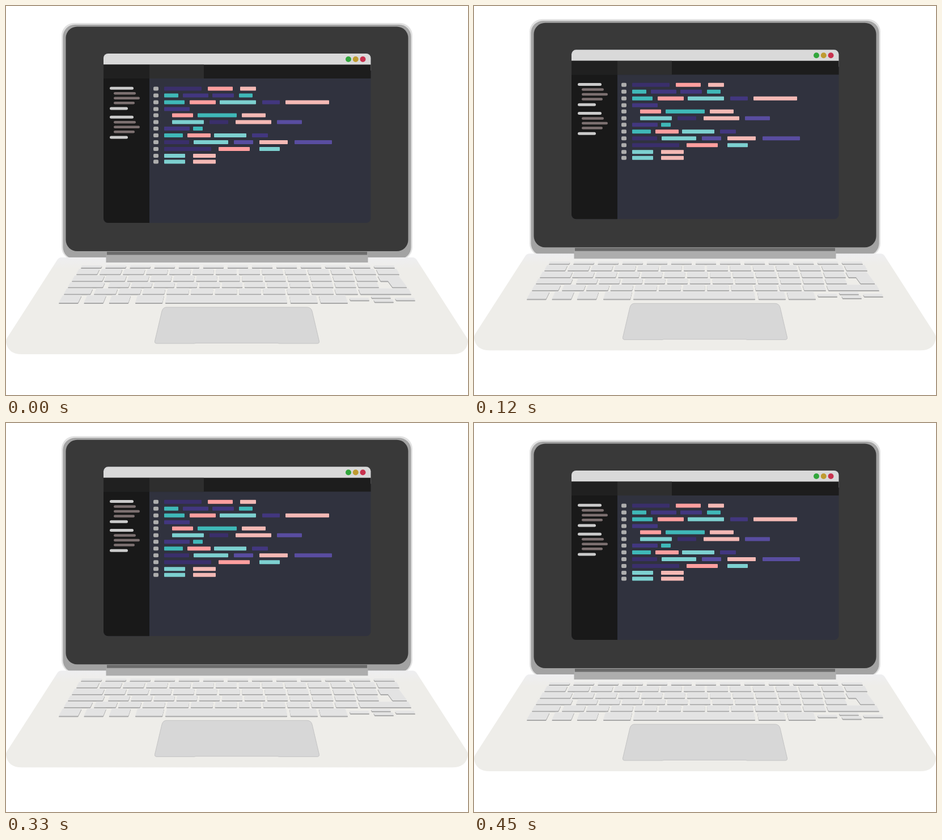
Recreate the animation shown at these times as an HTML page with a canvas. Size 815x687 px, loop 480 ms.

```html
<!DOCTYPE html>
<html lang="en">
<head>
<meta charset="utf-8">
<title>Laptop</title>
<style>
  html, body { margin: 0; width: 100%; height: 100%; overflow: hidden; background: #fff; }
  canvas { display: block; }
</style>
</head>
<body>
<canvas width="815" height="687"></canvas>
<script>
const ctx = document.querySelector('canvas').getContext('2d');
const CENTER = 407.5, HORIZON = -50;

function box(x, y, w, h, r, color) {
  ctx.fillStyle = color;
  ctx.beginPath();
  ctx.roundRect(x, y, w, h, r);
  ctx.fill();
}

function shape(d, color, stroke) {
  const path = new Path2D(d);
  ctx.fillStyle = color;
  ctx.fill(path);
  if (stroke) {
    ctx.strokeStyle = stroke;
    ctx.lineWidth = 1;
    ctx.stroke(path);
  }
}

// Moves x from one depth line to another along the perspective.
const project = (x, from, to) => CENTER + (x - CENTER) * (to - HORIZON) / (from - HORIZON);

function keycap(d) {
  ctx.save();
  ctx.translate(0, 1);
  shape(d, '#a6a6a6', '#a6a6a6');
  ctx.translate(0, -2);
  shape(d, '#e3e3e3', '#e7e7e7');
  ctx.restore();
}

// Fills left..right (measured along the front edge) with equal keys.
function keys(top, bottom, left, right, count = 1, gap = 4) {
  const pitch = (right - left + gap) / count;
  const back = top + 1.5, front = bottom - 1.5;
  for (let i = 0; i < count; i++) {
    const a = left + i * pitch + .5, b = a + pitch - gap - 1;
    keycap(`M${project(a, front, back)} ${back}H${project(b, front, back)}L${b} ${front}H${a}Z`);
  }
}

function lid() {
  box(98, 30, 619, 418, 22, '#e1e1e1');
  box(100.5, 33, 614, 414, 21, '#a3a3a3');
  box(105.5, 36.5, 604, 396.5, 20, '#393939');
}

const CODE_COLORS = {
  n: '#3a2f6b', b: '#42377f', v: '#594da0', t: '#3fb8b8',
  l: '#7dd0d0', p: '#ff9f9f', s: '#f4b9b5'
};
const CODE = [
  [146, 'n279-345 p356-400 s413-441'],
  [158, 't279-304 b312-357 b364-402 t411-435'],
  [170, 't279-315 p324-370 l377-441 b452-483 s493-570'],
  [182, 'b279-324'],
  [193, 'p293-330 t338-407 s416-458'],
  [205, 'l293-349 n359-392 s405-468 v478-522'],
  [216.5, 'b279-324 t330-347'],
  [228.5, 't279-312 p320-361 l367-424 b434-462'],
  [240.5, 'n279-323 l331-392 v402-436 s447-497 v509-575'],
  [252.5, 'n279-362 p375-430 l447-483'],
  [264.5, 'l279-316 s330-370'],
  [275, 'l279-316 s330-370']
];

function editor() {
  box(172, 84, 471.5, 299, 8, '#30323e');
  box(172, 84, 471.5, 30, [8, 8, 0, 0], '#d9d9d9');
  box(172, 103.5, 471.5, 24.5, 0, '#1d1d1d');
  box(172, 103.5, 81, 24.5, 0, '#202020');
  box(253, 103.5, 96, 24.5, 0, '#2e2e2e');
  box(172, 128, 81, 255, [0, 0, 0, 8], '#191919');
  ['#32a63c', '#bf9b30', '#c8324e'].forEach((c, i) => box(599 + i * 12.75, 89, 10, 10, 5, c));

  for (const y of [145.2, 196.2]) {
    box(183, y - 2.5, 42, 5, 2.5, '#cbcbcb');
    [39, 46, 37].forEach((w, i) => box(190, y + 6.8 + i * 8.5, w, 4.4, 2.2, '#7c7070'));
    box(183, y + 33.2, 32, 5, 2.5, '#cbcbcb');
  }

  for (const [y, line] of CODE) {
    box(260, y - 3.5, 9, 7, 2, '#adadad');
    for (const bar of line.split(' ')) {
      const [from, to] = bar.slice(1).split('-').map(Number);
      box(from, y - 3.5, to - from, 7, 1, CODE_COLORS[bar[0]]);
    }
  }
}

function base() {
  const shade = ctx.createLinearGradient(0, 444, 0, 464);
  shade.addColorStop(0, '#eeeef0');
  shade.addColorStop(1, '#eeede9');
  shape('M98 444H717Q722 444 725 449L813 586Q815 589 815 593Q812 615 787 615H28Q3 615 0 593Q0 589 2 586L90 449Q93 444 98 444Z', shade);
  box(178, 434, 459, 7, 0, '#6c6c6c');
  box(176.5, 439.5, 462, 13.5, 0, '#adadad');
}

function keyboard() {
  keys(458, 464, 132, 686, 13, 7);
  keys(464, 475.5, 124, 694, 14);
  keys(475.5, 487.5, 116, 170);
  keys(475.5, 487.5, 173, 656, 12);
  keys(487.5, 498.5, 109, 171);
  keys(487.5, 498.5, 180, 658, 12);
  keycap('M656 477H692L707 497H682L674 486H661Z');
  keys(498.5, 510.5, 102, 149);
  keys(498.5, 510.5, 155, 621, 11);
  keys(498.5, 510.5, 625, 715);
  keys(510.5, 526, 93, 216, 3, 10);
  keys(510.5, 526, 228, 276);
  keys(510.5, 526, 281, 496);
  keys(510.5, 526, 502, 603, 2, 5);
  keys(515, 521.5, 607, 641);
  keys(511.5, 517.5, 645, 679);
  keys(517.5, 524.5, 650, 684);
  keys(515, 521.5, 688, 722);
}

function trackpad() {
  shape('M283 532H531Q538 532 540 539L552.5 592Q553 596 549 596H482L479 595.3H335L332 596H266Q262 596 262.5 592L275 539Q277 532 283 532Z', '#d7d7d7', '#c4c4c4');
}

// Rises in six steps, rests at the top, then comes back down.
function draw(now) {
  const step = Math.floor(now / 30) % 16;
  const rise = step < 9 ? Math.min(step, 6) : Math.min(5, 15 - step);
  ctx.setTransform(1, 0, 0, 1, 0, 0);
  ctx.clearRect(0, 0, 815, 687);
  ctx.translate(0, -rise * 10 / 6);
  lid();
  editor();
  base();
  keyboard();
  trackpad();
}

const start = performance.now();
function tick() {
  draw(performance.now() - start);
  requestAnimationFrame(tick);
}
tick();
</script>
</body>
</html>
```
